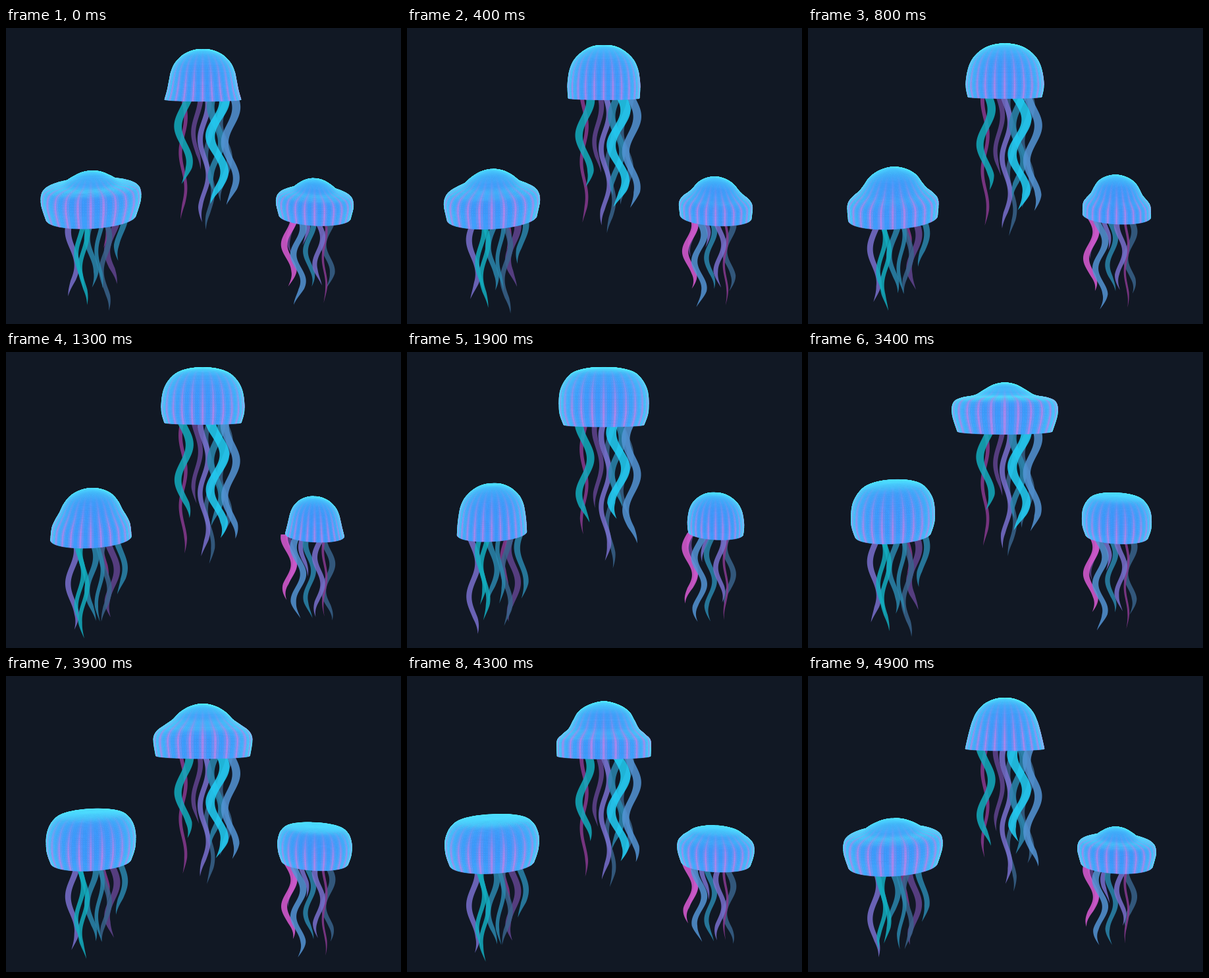
Recreate the animation shown at these times as an HTML page with a canvas. Size 600 by 451 pixels, loop 5000 ms.

```html
<!DOCTYPE html>
<html lang="en">
<head>
<meta charset="utf-8">
<title>Jellyfish</title>
<style>
html, body { margin: 0; width: 100%; height: 100%; overflow: hidden; background: #111824; }
canvas { display: block; }
</style>
</head>
<body>
<canvas id="stage" width="600" height="451"></canvas>
<script>
const ctx = document.getElementById('stage').getContext('2d');
const LOOP = 5000, STEP = 100, WAVE = 3100, TAU = Math.PI * 2;

// Bell outline poses: time, then radius and height from the apex to the rim
const POSES = [
  [0,    0, 33, 14, 34, 30, 41, 42, 53, 48, 66, 51, 80, 54, 95, 58, 109],
  [400,  0, 27, 16, 28, 31, 35, 44, 47, 51, 61, 54, 76, 55, 91, 54, 107],
  [800,  0, 24, 18, 26, 33, 32, 46, 43, 54, 57, 58, 74, 59, 90, 56, 105],
  [1900, 0, 24, 24, 25, 46, 31, 58, 42, 66, 58, 68, 76, 67, 94, 61, 111],
  [2600, 0, 44, 28, 44, 56, 48, 68, 57, 73, 69, 75, 82, 73, 100, 67, 117],
  [3400, 0, 47, 17, 50, 32, 58, 46, 66, 66, 70, 78, 77, 80, 95, 72, 121],
  [4300, 0, 39, 22, 44, 38, 54, 46, 67, 53, 80, 64, 90, 71, 99, 71, 122]
];

const COLORS = {
  cyan: '34,210,250', teal: '18,175,192', sea: '42,135,175', blue: '84,150,215',
  slate: '56,100,140', purple: '122,112,208', dusk: '98,68,145',
  pink: '222,92,215', plum: '138,58,145'
};

// Tentacles: colour, x, width, height of the left bulge, shortest end, phase of the end
const JELLIES = [
  { x: 299, y: 0, size: 1, tilt: 0, shift: 0, arms: [
    ['plum', 269, 6, 190, 272, .55], ['slate', 332, 11, 145, 250, .4],
    ['dusk', 290, 8, 160, 205, .3], ['slate', 309, 8, 195, 304, .1],
    ['purple', 301, 9, 170, 296, 0], ['teal', 270, 13, 150, 236, .05],
    ['sea', 319, 12, 120, 236, .4], ['blue', 341, 13, 175, 264, .15],
    ['cyan', 321, 16, 165, 252, .45]
  ] },
  { x: 129, y: 174, size: .95, tilt: -.05, shift: 3350, arms: [
    ['dusk', 161, 11, 340, 390, 0], ['plum', 150, 8, 355, 328, .2],
    ['slate', 151, 9, 370, 405, .75], ['purple', 101, 10, 310, 407, .05],
    ['teal', 112, 8, 345, 385, .4], ['sea', 130, 10, 320, 380, .45],
    ['teal', 118, 8, 365, 405, .5], ['sea', 142, 7, 340, 383, .4],
    ['sea', 174, 10, 338, 348, .2]
  ] },
  { x: 469, y: 196, size: .756, tilt: .05, shift: 3650, arms: [
    ['dusk', 434, 8, 325, 340, .2], ['slate', 489, 10, 330, 384, .5],
    ['plum', 484, 4, 350, 400, .7], ['purple', 453, 8, 345, 320, .4],
    ['pink', 430, 11, 330, 376, .65], ['sea', 461, 9, 340, 390, .15],
    ['blue', 444, 11, 345, 404, .65], ['purple', 475, 9, 360, 380, .45]
  ] }
];

const mix = (a, b, p) => a + (b - a) * p;
const clamp = v => Math.max(0, Math.min(1, v));
const blend = (a, b, p) => a.map((v, i) => mix(v, b[i], p));

function poseAt(t) {
  t %= LOOP;
  const i = POSES.findLastIndex(p => p[0] <= t);
  const a = POSES[i], b = POSES[(i + 1) % POSES.length];
  const p = (t - a[0]) / ((b[0] || LOOP) - a[0]);
  const points = [];
  for (let n = 1; n < a.length; n += 2) {
    points.push([mix(a[n], b[n], p), mix(a[n + 1], b[n + 1], p)]);
  }
  return points;
}

// Catmull-Rom curve through the outline
function smooth(points) {
  const all = [[-points[1][0], points[1][1]], ...points, points.at(-1)];
  const curve = [], cuts = 5;
  for (let i = 1; i < all.length - 2; i++) {
    for (let c = 0; c < cuts; c++) {
      const u = c / cuts;
      curve.push([0, 1].map(k => {
        const [a, b, d, e] = [-1, 0, 1, 2].map(o => all[i + o][k]);
        return b + .5 * u * (d - a + u * (2 * a - 5 * b + 4 * d - e + u * (3 * (b - d) + e - a)));
      }));
    }
  }
  curve.push(points.at(-1));
  return curve;
}

function drawBell(jelly, curve) {
  const rings = curve.map(([r, y]) => {
    const cy = jelly.y + y * jelly.size;
    return { r: r * jelly.size, y: cy, k: (cy - 66) * .00112 };
  });
  const project = (ring, a) => {
    const dx = ring.r * Math.sin(a);
    return [jelly.x + dx, ring.y + ring.k * ring.r * Math.cos(a) + jelly.tilt * dx];
  };
  const unit = TAU / 120;
  ctx.lineWidth = .7;
  for (let i = rings.length - 2; i >= 0; i--) {
    const top = rings[i], low = rings[i + 1];
    const dr = low.r - top.r, dy = low.y - top.y, len = Math.hypot(dr, dy) || 1;
    const glow = clamp((i / rings.length - .18) / .6);
    for (let j = -60; j < 60; j++) {
      const facing = (dy * Math.cos(j * unit) + dr * top.k) / len;
      if (facing < 0) continue;
      const edge = Math.pow(1 - Math.min(1, facing), 1.4);
      const band = [1, .35, 0, 0, .35][(j + 60) % 5];
      const base = blend([62, 154, 252], [82, 236, 255], edge);
      const color = blend(base, [190, 132, 236], band * glow * .8);
      const a = (j - .5) * unit, b = (j + .5) * unit;
      ctx.fillStyle = ctx.strokeStyle = `rgb(${color.map(Math.round)})`;
      ctx.beginPath();
      ctx.moveTo(...project(top, a));
      ctx.lineTo(...project(top, b));
      ctx.lineTo(...project(low, b));
      ctx.lineTo(...project(low, a));
      ctx.closePath();
      ctx.fill();
      ctx.stroke();
    }
  }
}

function drawArm(jelly, start, t, [color, x, width, bulge, shortest, phase]) {
  const wave = 108 * jelly.size;
  const end = shortest + 36 * jelly.size * ((t / WAVE + phase) % 1);
  const left = [], right = [];
  for (let y = start; y < end + 3; y += 3) {
    const at = Math.min(y, end);
    const u = (at - start) / (end - start);
    const cx = x - width * .68 * Math.cos(TAU * ((at - bulge) / wave - t / WAVE));
    const half = width / 2 * (1 - .3 * u) * clamp((end - at) / 24);
    left.push([cx - half, at]);
    right.unshift([cx + half, at]);
  }
  ctx.fillStyle = `rgba(${COLORS[color]},.84)`;
  ctx.beginPath();
  for (const p of [...left, ...right]) ctx.lineTo(...p);
  ctx.fill();
}

function draw(t) {
  ctx.fillStyle = '#111824';
  ctx.fillRect(0, 0, 600, 451);
  for (const jelly of JELLIES) {
    const curve = smooth(poseAt(t + jelly.shift));
    const rim = jelly.y + curve.at(-1)[1] * jelly.size;
    for (const arm of jelly.arms) drawArm(jelly, rim - 1, t, arm);
    drawBell(jelly, curve);
  }
}

let shown = -1;
function tick() {
  const step = Math.floor(performance.now() % LOOP / STEP);
  if (step !== shown) draw((shown = step) * STEP);
  requestAnimationFrame(tick);
}
tick();
</script>
</body>
</html>
```
